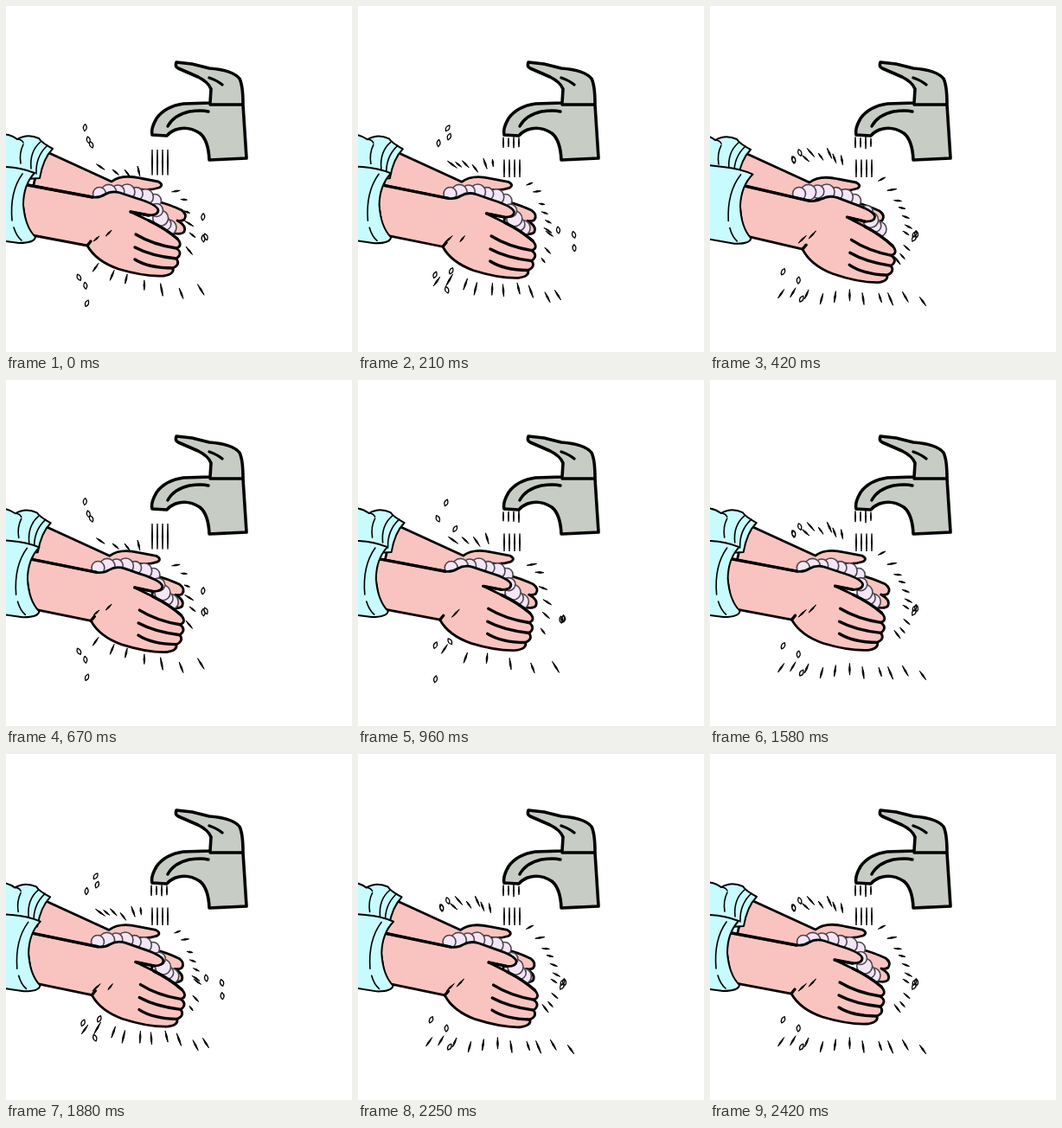
Write an HTML page that moves like this. It is 400 px wide and 400 px high and loops after 2.46 s.

```html
<!DOCTYPE html>
<html lang="en">
<head>
<meta charset="utf-8">
<title>Washing hands</title>
<style>
  html, body { margin: 0; width: 100%; height: 100%; overflow: hidden; background: #fff; }
  svg { display: block; width: 100%; height: 100%; }
  path, circle { stroke: #000; stroke-linecap: round; stroke-linejoin: round; }
  .skin { fill: #f9c4bf; stroke-width: 2.8; }
  .sleeve { fill: #c8fbfd; stroke-width: 2; }
  .metal { fill: #c7ccc5; stroke-width: 3.6; }
  .line { fill: none; stroke-width: 3.4; }
  .fold { fill: none; stroke-width: 1.6; }
  .foam circle { fill: #f2e6f7; stroke: #4c464f; stroke-width: 1.6; }
  #dashes { stroke-width: .9; }
  #drops { fill: #fff; stroke-width: 1.3; }
</style>
</head>
<body>
<svg viewBox="0 0 400 400">
  <g id="back">
    <path class="skin" d="M40 172L50 170L122 203C130 197 142 196 155 199L176 203Q183 207 177 210Q165 214 150 211L110 235L30 215Z"/>
    <path class="skin" d="M175 226Q188 229 203 236Q210 241 206 247Q203 249 198 248Q209 254 206 261Q203 265 190 262L170 255Z"/>
    <path class="sleeve" d="M-10 148Q4 147 13 154Q25 147 38 153Q41 158 54 165Q43 176 39 199L-10 202Z"/>
    <path class="fold" d="M13 154Q18 154 20 158M40 157Q27 168 29 188M48 161Q34 174 35 194M20 160Q15 170 17 182"/>
  </g>
  <g id="foamLeft" class="foam"></g>
  <g id="foamRight" class="foam"></g>
  <g id="front">
    <path class="skin" d="M15 205L100 221Q108 222 114 218Q122 213 132 216L150 222C160 225 175 230 176 236Q176 242 165 242L144 238L165 248Q184 257 198 269Q205 277 197 280Q205 286 197 292Q202 299 193 303Q195 310 182 312Q160 313 130 304Q104 295 94 277L25 264Z"/>
    <path class="line" d="M20 206L100 221M144 238L165 242M165 248Q184 257 198 269M197 280Q170 276 150 264M197 292Q168 289 149 279M193 303Q165 303 149 293M94 277L98 272"/>
    <path class="sleeve" d="M-30 184L0 186Q18 187 33 193Q20 207 20 230Q22 255 34 267Q33 274 15 274L-30 268Z"/>
    <path class="fold" d="M19 194Q4 215 7 248M9 256Q12 266 18 271"/>
  </g>
  <path id="dashes"/>
  <path id="drops"/>
  <path class="metal" d="M197 65L215 67L235 72Q262 74 270 84Q274 92 274 114L278 176L235 178Q234 155 224 147Q210 138 196 143Q189 146 186 150L169 149Q167 142 174 130Q184 116 205 113L236 112L237 96Q234 88 222 82L199 72Q195 70 197 65Z"/>
  <path class="line" d="M236 114L273 114M235 83Q244 86 250 91M187 139Q194 126 212 122Q226 120 234 122"/>
</svg>
<script>
const FPS = 24, FRAMES = 59, LOOP = 2460, RUBS = 3;
const $ = id => document.getElementById(id);
const lerp = (a, b, t) => a + (b - a) * t;

function seededRandom(seed) {
  return () => {
    const n = Math.sin(seed++ * 12.9898) * 43758.5453;
    return n - Math.floor(n);
  };
}

// Lens centred on a point, turned to an angle
function lens(x, y, angle, length, width) {
  const dx = Math.cos(angle) * length / 2, dy = Math.sin(angle) * length / 2;
  const nx = -Math.sin(angle) * width, ny = Math.cos(angle) * width;
  return `M${x - dx} ${y - dy}Q${x + nx} ${y + ny} ${x + dx} ${y + dy}` +
    `Q${x - nx} ${y - ny} ${x - dx} ${y - dy}Z`;
}

// reach: how far the water flies, density: how many marks, flow: stream touches the tap
function makeSplash({ reach, density, flow }, index) {
  const random = seededRandom(100 * index + 7);
  const jitter = size => (random() - .5) * size;
  let dashes = '', drops = '';

  // Marks along a bowed line, run clockwise so that they bow and point outwards
  function row(count, length, x1, y1, x2, y2, bulge) {
    const span = Math.hypot(x2 - x1, y2 - y1), n = Math.round(count * density);
    for (let i = 0; i < n; i++) {
      const t = (i + .5) / n, bow = bulge * 4 * t * (1 - t) / span;
      const x = lerp(x1, x2, t) + (y2 - y1) * bow + jitter(5);
      const y = lerp(y1, y2, t) - (x2 - x1) * bow + jitter(10);
      dashes += lens(x, y, Math.atan2(y - 220, x - 160), length + jitter(5), 1.8);
    }
  }
  row(5, 11, 104, 187 - 16 * reach, 158, 192 - 16 * reach, 0);
  row(8, 9, 193, 205 - 5 * reach, 212, 290 + 15 * reach, 10 + 16 * reach);
  row(9, 13, 234 + 18 * reach, 328 + 10 * reach, 92 - 20 * reach, 298 + 34 * reach, 10 - 8 * reach);
  row(2, 11, 126, 266, 100, 266, 0);

  for (let x = 168; x < 190; x += 6) {
    if (flow) dashes += lens(x, 158, Math.PI / 2, 12 + jitter(5), 1.3);
    dashes += lens(x + 1, flow ? 188 : 181, Math.PI / 2, flow ? 20 : 29, 1.3);
  }

  for (const [x, y] of [[102, 160], [240, 258], [95, 324]]) {
    for (let i = 0; i < 3; i++) {
      drops += lens(x + jitter(26), y + jitter(46), Math.PI / 2 + jitter(1.2), 8, 4);
    }
  }
  return { dashes, drops };
}

const splashes = [
  { reach: 0, density: .8, flow: false },
  { reach: .4, density: 1.1, flow: true },
  { reach: 1, density: 1.2, flow: true },
  { reach: .3, density: .7, flow: true }
].map(makeSplash);

// Overlapping bubbles along a shallow curve
function foam(id, count, x1, y1, x2, y2, sag) {
  for (let i = count - 1; i >= 0; i--) {
    const t = i / (count - 1);
    const x = lerp(x1, x2, t), y = lerp(y1, y2, t) - sag * Math.sin(Math.PI * t);
    $(id).innerHTML += `<circle cx="${x}" cy="${y}" r="${7.5 + i % 2 * 1.5}"/>`;
  }
}
foam('foamLeft', 7, 108, 217, 172, 225, 6);
foam('foamRight', 4, 174, 236, 188, 256, -3);

const move = (id, x, y, turn = 0) =>
  $(id).setAttribute('transform', `translate(${x} ${y}) rotate(${turn} 20 206)`);

function draw() {
  const time = performance.now() % LOOP;
  const frame = Math.min(FRAMES - 1, Math.floor((time + 4.9) * FPS / 1000));
  const phase = frame * RUBS / FRAMES % 1;
  const rub = Math.max(0, Math.min(1, (phase - .15) / .34, (.95 - phase) / .42));

  move('front', 16 * rub, rub, 2.4 * rub);
  move('back', -7 * rub, rub);
  move('foamLeft', -5 * rub, 0);
  move('foamRight', 7 * rub, 2 * rub);

  const splash = splashes[frame % splashes.length];
  $('dashes').setAttribute('d', splash.dashes);
  $('drops').setAttribute('d', splash.drops);
  requestAnimationFrame(draw);
}
draw();
</script>
</body>
</html>
```
